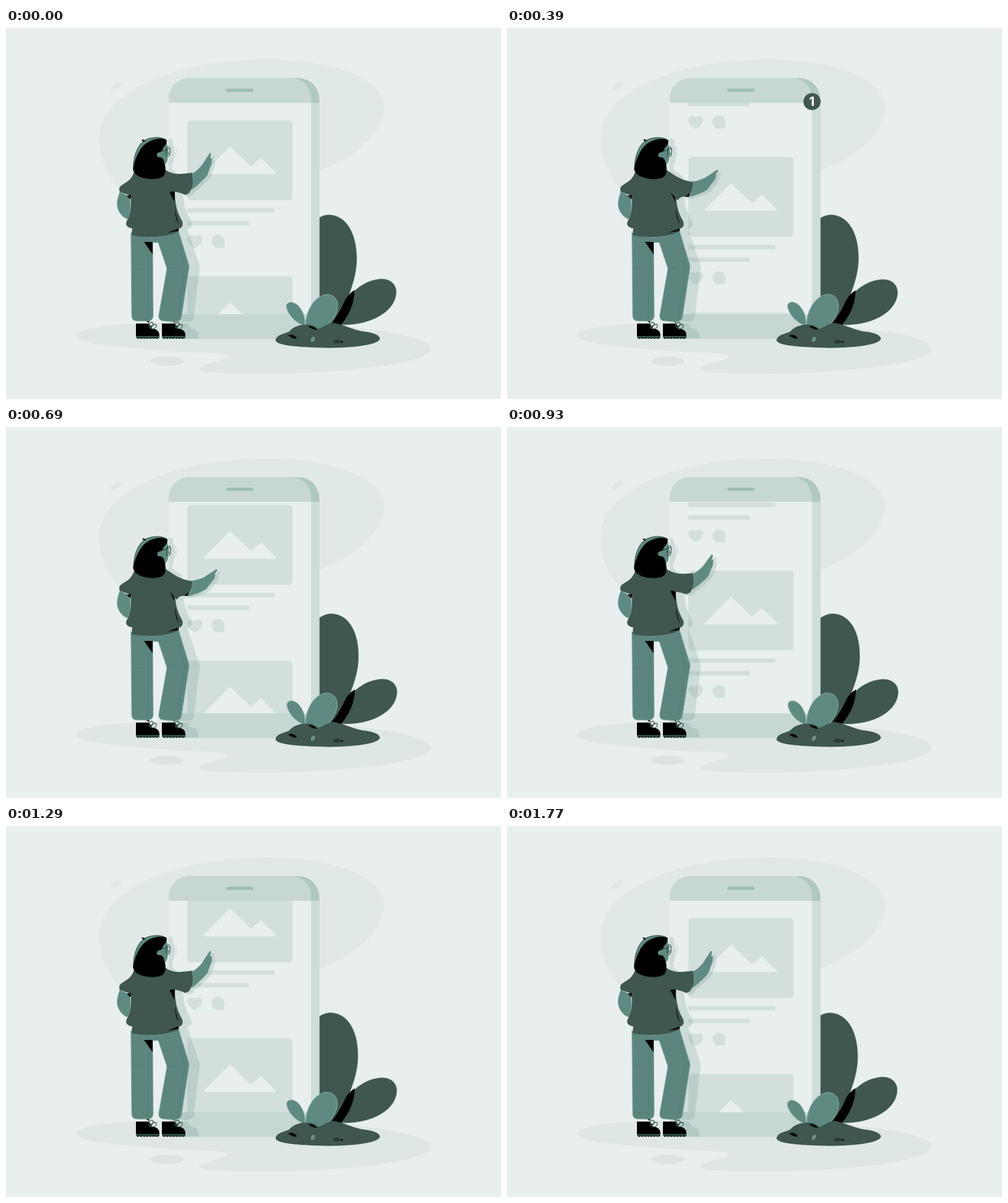
Animation, 800 px wide and 600 px high, one loop 1.8 s. Source, as an HTML page with a canvas:

```html
<!DOCTYPE html>
<html lang="en">
<head>
<meta charset="utf-8">
<title>Scrolling feed</title>
<style>
html, body { margin: 0; width: 100%; height: 100%; overflow: hidden; background: #e8efee; }
canvas { display: block; }
</style>
</head>
<body>
<canvas id="stage" width="800" height="600"></canvas>
<script>
const ctx = document.getElementById('stage').getContext('2d');
const layer = document.createElement('canvas');
layer.width = 800;
layer.height = 600;
const shade = layer.getContext('2d');

const LOOP = 1800;
const C = {
  bg: '#e8efee', blob: '#e1e9e7', ground: '#dfe7e6', bar: '#c6d7d4', edge: '#b0c8c3',
  side: '#cdddda', card: '#d2dfdc', speaker: '#9dbcb6', dark: '#3f5651', teal: '#5f8a82',
  pants: '#5c857e', line: '#8fb6ac', sole: '#2f4c46', black: '#000'
};

const P = d => new Path2D(d);
const shapes = {
  blob: P('M151 178C151 100 280 51 420 51C535 51 611 84 611 128C611 170 562 211 506 231L400 280Q230 295 186 263C160 235 151 205 151 178Z'),
  ground: P('M114 497C114 481 220 474 350 475C500 475 686 489 686 519C686 545 520 560 400 559C350 558 311 557 312 551C313 543 358 538 358 531C356 523 300 527 250 521C170 514 114 511 114 497Z'),
  bigLeaf: P('M530 483C490 450 470 400 478 355C483 322 503 302 522 302C552 303 567 335 567 373C567 405 553 440 530 483Z'),
  band: P('M563 424Q553 430 548 440Q539 460 526 478L540 482Q555 464 560 446Q563 436 563 424Z'),
  sideLeaf: P('M528 480C540 448 565 410 603 406C624 404 634 418 630 434C624 462 585 482 540 480Z'),
  frontLeaf: P('M484 481C484 460 496 435 517 431C533 430 539 444 535 458C530 474 518 486 503 488Z'),
  tinyLeaf: P('M483 481C469 479 453 461 453 449C455 441 466 442 473 450C481 459 484 470 483 481Z'),
  mound: P('M436 505C437 495 454 495 459 490C465 483 476 480 486 480C497 480 501 484 504 487C514 485 520 477 530 477C545 480 560 488 576 491C595 493 603 497 604 502C604 512 560 517 520 517C480 516 436 514 436 505Z'),
  moundShade: P('M488 482Q497 481 503 488Q495 488 488 482ZM456 497C463 495 468 498 470 502Q464 504 456 497ZM541 506L545 507L542 510Z'),
  stone: P('M528 508C531 503 538 503 541 507C540 511 532 511 528 508Z'),
  seed: P('M494 507C492 503 496 499 498 500C499 504 498 507 494 507Z'),
  cap: P('M206 224C206 205 214 187 225 181C238 175 254 176 260 182L240 200Z'),
  hair: P('M206 224C210 207 218 191 229 185C241 178 253 178 259 181C261 188 255 191 253 196C252 201 247 201 244 205C247 210 254 208 255 215C258 224 259 233 255 239C248 247 220 246 209 236C205 230 205 228 206 224Z'),
  nub: P('M219 181Q222 179 225 183L222 184Z'),
  face: P('M240 185L259 184C261 190 261 194 262 198L264 204L261 206C262 214 260 220 253 223L242 219Z'),
  ear: P('M252 201C246 200 243 203 244 207C246 210 250 209 254 207Z'),
  glasses: P('M252 199L264 195M259 200A3.2 6 5 1 0 265 200A3.2 6 5 1 0 259 200'),
  shirt: P('M207 233C219 246 247 248 257 229L273 240L273 270C274 288 277 299 284 311C288 319 284 324 278 325L279 329C255 341 221 339 203 335L204 324C195 323 191 317 197 309C202 298 203 284 201 271L184 265Q182 261 184 257C190 250 201 250 207 233Z'),
  shirtShade: P('M264 265L273 264L272 281ZM273 291Q275 307 280 318Q273 309 273 291ZM261 331L279 324L279 328ZM195 271L202 270L201 277Z'),
  backArm: P('M184 265C178 280 178 290 184 299C188 305 194 309 197 309C202 298 202 285 200 273Z'),
  pants: P('M202 331C225 342 255 340 279 328L281 335L295 381Q297 386 295 393L284 465C283 473 280 475 270 475L257 474C249 474 246 471 247 463L260 389L246 347L237 347L238 464C238 471 235 474 228 474L214 474C205 474 203 471 203 464Z'),
  crotch: P('M223 346L237 346L237 366Z'),
  seams: P('M231 365L228 472M205 390Q212 388 220 390M260 389Q266 387 272 388M279 350L289 386L278 465'),
  shoe: P('M210 478L231 478L236 486C244 487 248 490 248 498L210 498Z'),
  sole: P('M210 498H248V501Q247 503 245 502H212Q210 502 210 498Z'),
  laces: P('M232 485C229 477 236 473 238 478C238 483 234 485 232 485C237 479 244 477 243 482C242 487 236 488 232 485'),
  ankle: P('M223 472L232 473L231 477Z'),
  heart: P('M305 356C298 352 293 348 293 341C293 335 301 333 305 338C309 333 317 335 317 341C317 348 312 352 305 356Z'),
  bubble: P('M353 355L346 355A10.6 10.6 0 1 1 352 350Z'),
  hills: P('M321 235L362 193.5L396 226L412 212L435 235Z')
};

// Arm outlines: raised, lowered
const FORE = [
  [299, 237, 314, 229, 322, 214, 330, 202, 331, 205, 329, 212, 332, 210, 332, 219, 325, 238, 317, 248, 301, 261],
  [299, 249, 316, 247, 326, 239, 340, 230, 341, 232, 336, 238, 338, 238, 336, 245, 323, 262, 311, 269, 294, 273]
];
const SLEEVE = [
  [257, 229, 271, 239, 285, 236, 301, 234, 304, 246, 302, 257, 296, 267, 290, 270, 281, 266, 270, 264],
  [257, 229, 273, 241, 287, 248, 301, 249, 302, 257, 299, 263, 294, 273, 288, 273, 280, 272, 276, 279]
];

const mix = ([a, b], k) => a.map((v, i) => v + (b[i] - v) * k);
const inOut = x => {
  x = Math.min(1, Math.max(0, x));
  return x < .5 ? 2 * x * x : 1 - 2 * (1 - x) * (1 - x);
};

function fill(g, path, color) {
  g.fillStyle = color;
  g.fill(path);
}

function stroke(g, path, color, width) {
  g.strokeStyle = color;
  g.lineWidth = width;
  g.stroke(path);
}

function box(x, y, w, h, r, color) {
  ctx.beginPath();
  ctx.roundRect(x, y, w, h, r);
  ctx.fillStyle = color;
  ctx.fill();
}

function oval(x, y, rx, ry, turn, color) {
  ctx.beginPath();
  ctx.ellipse(x, y, rx, ry, turn, 0, 7);
  ctx.fillStyle = color;
  ctx.fill();
}

function turned(g, x, y, deg, draw) {
  g.save();
  g.translate(x, y);
  g.rotate(deg * Math.PI / 180);
  g.translate(-x, -y);
  draw();
  g.restore();
}

function card(y) {
  ctx.save();
  ctx.translate(0, y - 150);
  box(293, 149.5, 170, 129, 6, C.card);
  fill(ctx, shapes.hills, C.bg);
  stroke(ctx, shapes.hills, C.bg, 3);
  box(293, 291.5, 140.5, 7, 1, C.card);
  box(293, 312, 99.5, 7, 1, C.card);
  fill(ctx, shapes.heart, C.card);
  fill(ctx, shapes.bubble, C.card);
  ctx.restore();
}

function phone(t) {
  box(263, 81, 243.5, 422, [34, 34, 0, 0], C.edge);
  ctx.fillStyle = C.side;
  ctx.fillRect(493, 121, 13.5, 342);
  box(263, 81, 230, 422, [34, 32, 0, 0], C.bar);
  ctx.fillStyle = C.bar;
  ctx.fillRect(263, 463, 243.5, 40);
  ctx.fillStyle = C.bg;
  ctx.fillRect(263, 121, 230, 342);
  box(356, 98.3, 44, 5, 2.5, C.speaker);

  const x = Math.max(0, (t - 300) / 1500);
  const shift = 504 * (1 - (1 - x) * (1 - x)) % 252;
  ctx.save();
  ctx.beginPath();
  ctx.rect(263, 121, 230, 342);
  ctx.clip();
  for (let i = -1; i < 2; i++) card(150 + shift + i * 252);
  ctx.restore();
}

function armPaths(k) {
  const f = mix(FORE, k), s = mix(SLEEVE, k);
  const fore = new Path2D(), sleeve = new Path2D(), cuff = new Path2D();
  fore.moveTo(f[0], f[1]);
  fore.quadraticCurveTo(...f.slice(2, 6));
  for (let i = 6; i < 16; i += 2) fore.lineTo(f[i], f[i + 1]);
  fore.quadraticCurveTo(f[14], f[15], f[16], f[17]);
  fore.quadraticCurveTo(...f.slice(18, 22));
  fore.closePath();
  sleeve.moveTo(s[0], s[1]);
  sleeve.bezierCurveTo(...s.slice(2, 8));
  sleeve.quadraticCurveTo(...s.slice(8, 12));
  sleeve.lineTo(s[12], s[13]);
  sleeve.lineTo(s[14], s[15]);
  sleeve.quadraticCurveTo(...s.slice(16, 20));
  sleeve.lineTo(250, 250);
  sleeve.closePath();
  cuff.moveTo(s[6], s[7]);
  cuff.quadraticCurveTo(...s.slice(8, 12));
  cuff.lineTo(s[12], s[13]);
  return { fore, sleeve, cuff, s };
}

function shadow(arm, nod) {
  const g = shade;
  g.setTransform(1, 0, 0, 1, 0, 0);
  g.clearRect(0, 0, 800, 600);
  const solid = path => fill(g, path, C.teal);
  g.setTransform(1, 0, .036, 1, 3.2, 0);
  [shapes.shirt, shapes.pants].forEach(solid);
  turned(g, 238, 238, nod, () => {
    [shapes.cap, shapes.hair, shapes.face].forEach(solid);
    stroke(g, shapes.glasses, C.teal, 1);
  });
  g.translate(42, 0);
  [shapes.shoe, shapes.sole].forEach(solid);
  g.setTransform(1, 0, 0, 1, 6, 3);
  [arm.fore, arm.sleeve].forEach(solid);
  ctx.save();
  ctx.beginPath();
  ctx.rect(263, 121, 230, 382);
  ctx.clip();
  ctx.globalAlpha = .19;
  ctx.drawImage(layer, 0, 0);
  ctx.restore();
}

function shoe(dx) {
  ctx.save();
  ctx.translate(dx, 0);
  fill(ctx, shapes.ankle, C.black);
  fill(ctx, shapes.shoe, C.black);
  fill(ctx, shapes.sole, C.sole);
  ctx.fillStyle = C.black;
  for (let x = 212; x < 247; x += 5) ctx.fillRect(x, 501, 3, 1.5);
  stroke(ctx, shapes.laces, C.sole, 1.2);
  ctx.restore();
}

function person(arm, nod, k) {
  shoe(0);
  shoe(42);
  fill(ctx, shapes.pants, C.pants);
  stroke(ctx, shapes.pants, C.line, .8);
  fill(ctx, shapes.crotch, C.black);
  ctx.setLineDash([2, 1]);
  stroke(ctx, shapes.seams, '#527a72', .8);
  ctx.setLineDash([]);
  fill(ctx, shapes.backArm, C.teal);
  stroke(ctx, shapes.backArm, C.line, .8);
  fill(ctx, arm.fore, C.teal);
  stroke(ctx, arm.fore, C.teal, .8);
  fill(ctx, shapes.shirt, C.dark);
  fill(ctx, shapes.shirtShade, C.black);
  fill(ctx, arm.sleeve, C.dark);
  stroke(ctx, arm.cuff, C.line, .7);
  const [x, y] = arm.s.slice(12, 14);
  fill(ctx, P(`M${x} ${y}L${x - 6 * k} ${y}L${x + 1} ${y - 11 + 5 * k}Z`), C.black);

  turned(ctx, 238, 238, nod, () => {
    fill(ctx, shapes.face, C.teal);
    fill(ctx, shapes.cap, C.teal);
    stroke(ctx, shapes.cap, '#1d332e', .8);
    fill(ctx, shapes.hair, C.black);
    stroke(ctx, shapes.hair, '#1d332e', .6);
    fill(ctx, shapes.ear, C.teal);
    fill(ctx, shapes.nub, C.black);
    stroke(ctx, shapes.glasses, '#203b35', 1);
  });
}

function plant(sway) {
  turned(ctx, 540, 480, sway * 1.7, () => {
    fill(ctx, shapes.sideLeaf, C.dark);
    stroke(ctx, shapes.sideLeaf, C.line, .4);
  });
  turned(ctx, 530, 481, sway * .9, () => fill(ctx, shapes.band, C.black));
  turned(ctx, 490, 484, -sway * 1.6, () => {
    fill(ctx, shapes.frontLeaf, C.teal);
    stroke(ctx, shapes.frontLeaf, C.line, .9);
  });
  turned(ctx, 483, 481, sway * 1.8, () => {
    fill(ctx, shapes.tinyLeaf, C.teal);
    stroke(ctx, shapes.tinyLeaf, C.line, .7);
  });
  fill(ctx, shapes.mound, C.dark);
  stroke(ctx, shapes.mound, '#2d4640', .6);
  fill(ctx, shapes.stone, '#263b36');
  fill(ctx, shapes.moundShade, C.black);
  fill(ctx, shapes.seed, C.teal);
  stroke(ctx, shapes.seed, C.line, .9);
}

function badge(t) {
  const x = (t - 290) / 400;
  if (x <= 0 || x >= 1) return;
  const size = 1.39 * Math.sin(Math.PI * x);
  ctx.save();
  ctx.translate(493, 119);
  ctx.scale(size, size);
  oval(0, 0, 14, 14, 0, C.dark);
  ctx.fillStyle = '#fff';
  ctx.font = '800 20px Inter, sans-serif';
  ctx.textAlign = 'center';
  ctx.fillText('1', -.5, 7.2);
  ctx.restore();
}

function draw(t) {
  const lower = t < 555 ? inOut(t / 540) : 1 - inOut((t - 570) / 480);
  const k = lower / .86;
  const nod = k * 1.2;
  const sway = .5 - .5 * Math.cos(2 * Math.PI * t / LOOP);
  const arm = armPaths(k);

  ctx.lineJoin = ctx.lineCap = 'round';
  ctx.fillStyle = C.bg;
  ctx.fillRect(0, 0, 800, 600);
  fill(ctx, shapes.blob, C.blob);
  oval(178, 94.5, 11, 4.5, -.6, C.blob);
  fill(ctx, shapes.ground, C.ground);
  oval(260, 539, 27, 7.5, 0, '#dce5e3');
  turned(ctx, 532, 482, sway * 1.7, () => {
    fill(ctx, shapes.bigLeaf, C.dark);
    stroke(ctx, shapes.bigLeaf, C.line, .4);
  });
  phone(t);
  shadow(arm, nod);
  plant(sway);
  person(arm, nod, k);
  badge(t);
}

function tick() {
  draw(performance.now() % LOOP);
  requestAnimationFrame(tick);
}
tick();
</script>
</body>
</html>
```
